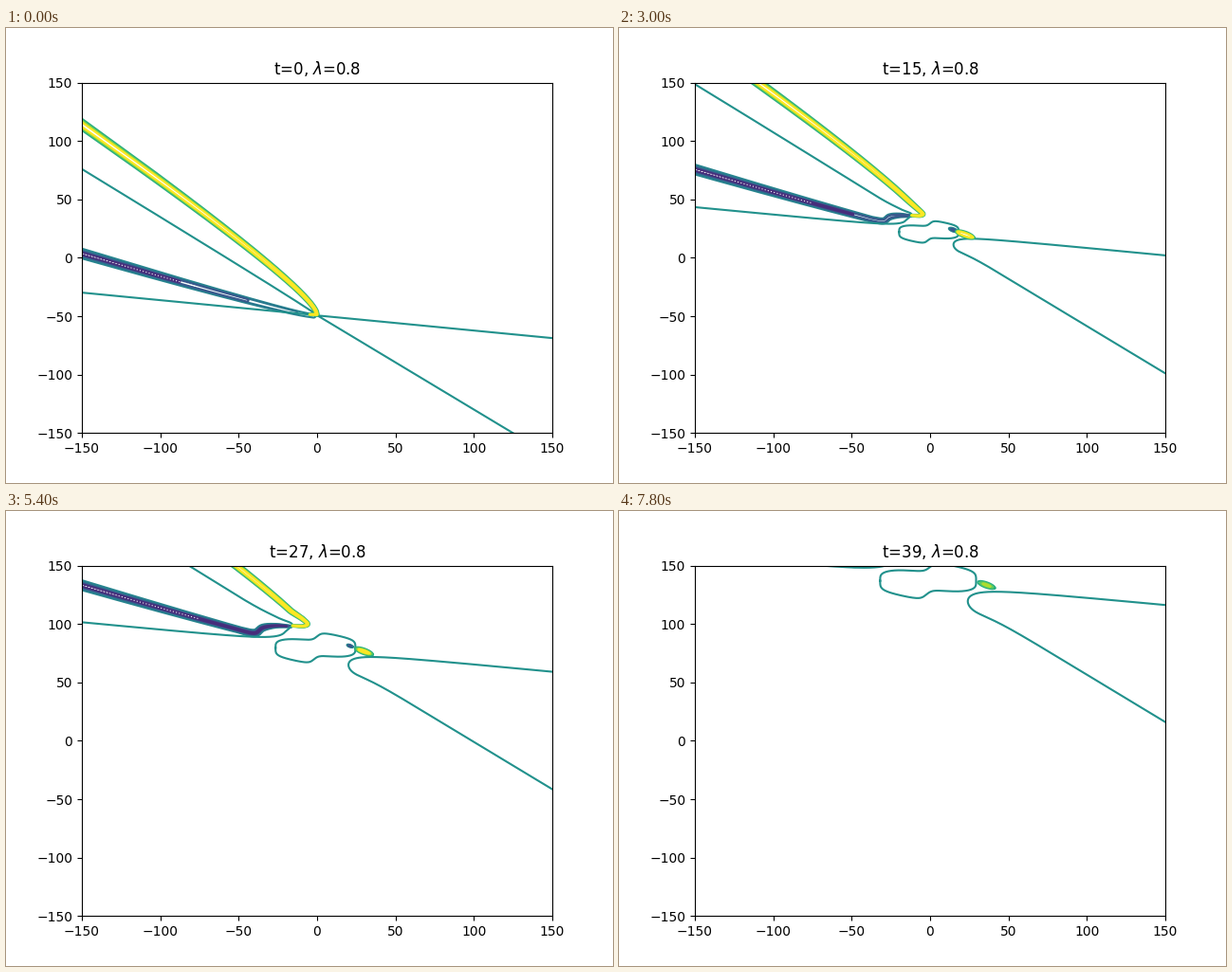
Animation, 640 px wide and 480 px high, one loop 8000 ms. Source, as a matplotlib script:

```python
import numpy as np
import matplotlib.pyplot as plt
from matplotlib.animation import FuncAnimation

FRAMES, STEP_MS = 40, 200
SCALE = np.array([496 / 300, 369.6 / 300])  # pixels per data unit
ZERO = "#21918c"
# (share of the band's half width, colour)
WARM = [(1, "#28ae80"), (0.72, "#5ec962"), (0.55, "#addc30"), (0.38, "#fde725")]
COOL = [(1, "#25858e"), (0.7, "#2a788e"), (0.46, "#38588c"), (0.24, "#472d7b")]

# Key points of the band ends, in units of sqrt(t)
WARM_TIP = np.array([(-1.75, 4.6), (-1.15, 3.75), (-1.6, 3.45), (-3.0, 3.5)])
COOL_HOOK = np.array([(-7.6, 2.3), (-6.7, 3.15), (-5.2, 3.5), (-3.15, 3.4)])


def smooth(p, n=24):
    """Cubic Hermite curve through the points; extra columns are carried along."""
    gaps = np.sqrt(np.hypot(*np.diff(p[:, :2], axis=0).T))
    m = np.gradient(p, np.concatenate([[0], np.cumsum(gaps)]), axis=0)
    s = np.linspace(0, 1, n, endpoint=False)[:, None]
    parts = [(2 * s**3 - 3 * s**2 + 1) * p[i]
             + (s**3 - 2 * s**2 + s) * gaps[i] * m[i]
             + (3 * s**2 - 2 * s**3) * p[i + 1]
             + (s**3 - s**2) * gaps[i] * m[i + 1] for i in range(len(gaps))]
    return np.vstack(parts + [p[-1:]])


def outline(curve, k):
    """Both sides of a band at k times its half width, with a round end."""
    pos, w = curve[:, :2] * SCALE, k * np.abs(curve[:, 2:3])
    d = np.gradient(pos, axis=0)
    d /= np.hypot(d[:, 0], d[:, 1])[:, None]
    nrm = np.column_stack([-d[:, 1], d[:, 0]])
    a = np.linspace(0, np.pi, 12)[:, None]
    cap = pos[-1] + w[-1] * (nrm[-1] * np.cos(a) + d[-1] * np.sin(a))
    return np.vstack([pos + nrm * w, cap, (pos - nrm * w)[::-1]]) / SCALE


def warm_band(sig, t):
    r = np.geomspace(165, 3.2 * sig, 14)
    far = np.column_stack([-r, 0.82 * r + 3.3 * np.sqrt(r) + 0.7 * sig,
                           2 + 3 * (r / 150) ** 0.7])
    tip = np.column_stack([WARM_TIP * sig, np.linspace(2.1, 0.9, 4)])
    tip[-1, 0] -= 4 / (1 + t) ** 2
    return smooth(np.vstack([far, tip]))


def cool_band(sig):
    r = np.geomspace(165, 9.5 * sig, 10)
    far = np.column_stack([-r, 0.43 * r - 0.95 * np.sqrt(r),
                           1.5 + 3.5 * (r / 150) ** 0.75])
    width = np.minimum(np.linspace(4.6, 0.8, 4), 0.5 + 0.6 * sig)
    return smooth(np.vstack([far, np.column_stack([COOL_HOOK * sig, width])]))


def wing(sig, left=False):
    """Skewed hyperbola; the left one is mirrored and has a spur."""
    s = 4 * np.sinh(np.linspace(-1, 1, 240) * np.arcsinh(170 / (4 * sig)))
    x = np.hypot(3.85, s)
    y = -0.25 - 0.468 * x + 0.3385 * s - 1.15 / (1 + ((s + 1.8) / 5) ** 2) ** 2
    if left:
        y -= 0.35 * np.sqrt(np.maximum(-s, 0) / sig)
        x -= 0.95 * np.exp(-((s + 1.1) / 1.1) ** 2)
    return np.column_stack([x, y]) * (-sig if left else sig)


def loop(sig):
    """Flattened oval with a step on top, repeated upside down below."""
    a = np.linspace(np.pi, 0, 120)
    x = 4.9 * np.cos(a)
    step = np.tanh((x - 0.2) / 0.55) * np.exp(-(x / 3.4) ** 2)
    half = np.column_stack([x, np.sqrt(np.abs(np.sin(a))) * (1.9 + 0.6 * step)])
    return sig * (np.vstack([half, -half]) - (0.2, 0.15))


def ellipse(center, a, b, slope=-0.36):
    u = np.linspace(0, 2 * np.pi, 60)
    d = np.array([1, slope]) / np.hypot(1, slope)
    n = np.array([-d[1], d[0]])
    return center + (a * np.outer(np.cos(u), d) + b * np.outer(np.sin(u), n)) / SCALE


fig, ax = plt.subplots(figsize=(6.4, 4.8), dpi=100)


def draw(t):
    ax.clear()
    sig = max(np.sqrt(t), 0.2)
    base = np.array([0, -49.3 + 4.8 * t])
    size = min(1, sig / 2)

    def line(pts, color, **kw):
        x, y = (pts + base).T
        ax.plot(x, y, color=color, **kw)

    # Deeper levels begin further out and creep inward with time.
    cool = cool_band(sig)
    cool_mid = sig * np.array([3.1 + 0.18 * sig, 0.7 - 0.1 * sig])
    fade = size * np.sqrt(max(0, 1 - t / 38))
    for k, color in COOL:
        start = 150 * (1 - k) ** 2 - 2.5 * t
        line(outline(cool[-cool[:, 0] > start], k), color)
        if 0 < t < 36 and k > 0.3:
            line(ellipse(cool_mid, 6 * k * fade, 2.2 * k * fade), color)
    line(cool[cool[:, 0] < -75, :2], "white", lw=0.7, dashes=(1.2, 2.2))

    for curve in (wing(sig, left=True), wing(sig), loop(sig)):
        line(curve, ZERO)

    # The blob on the right sinks through the levels as 1/t.
    warm = warm_band(sig, t)
    height = 39 / max(t, 1)
    for (k, color), level in zip(WARM, (0.25, 0.6, 0.85, 1.03)):
        line(outline(warm, k), color)
        if t and height > level:
            r = np.sqrt(1 - level / height) * size
            line(ellipse(sig * np.array([5.75, -0.72]), 11 * r,
                         3.2 * r * (0.4 + 0.6 * k)), color)

    ax.set(xlim=(-150, 150), ylim=(-150, 150))
    ax.set_title(rf"t={t}, $\lambda$=0.8")
    return ax.lines


anim = FuncAnimation(fig, draw, frames=FRAMES, init_func=lambda: [],
                     interval=STEP_MS, repeat=True, repeat_delay=0)
plt.show()
```
